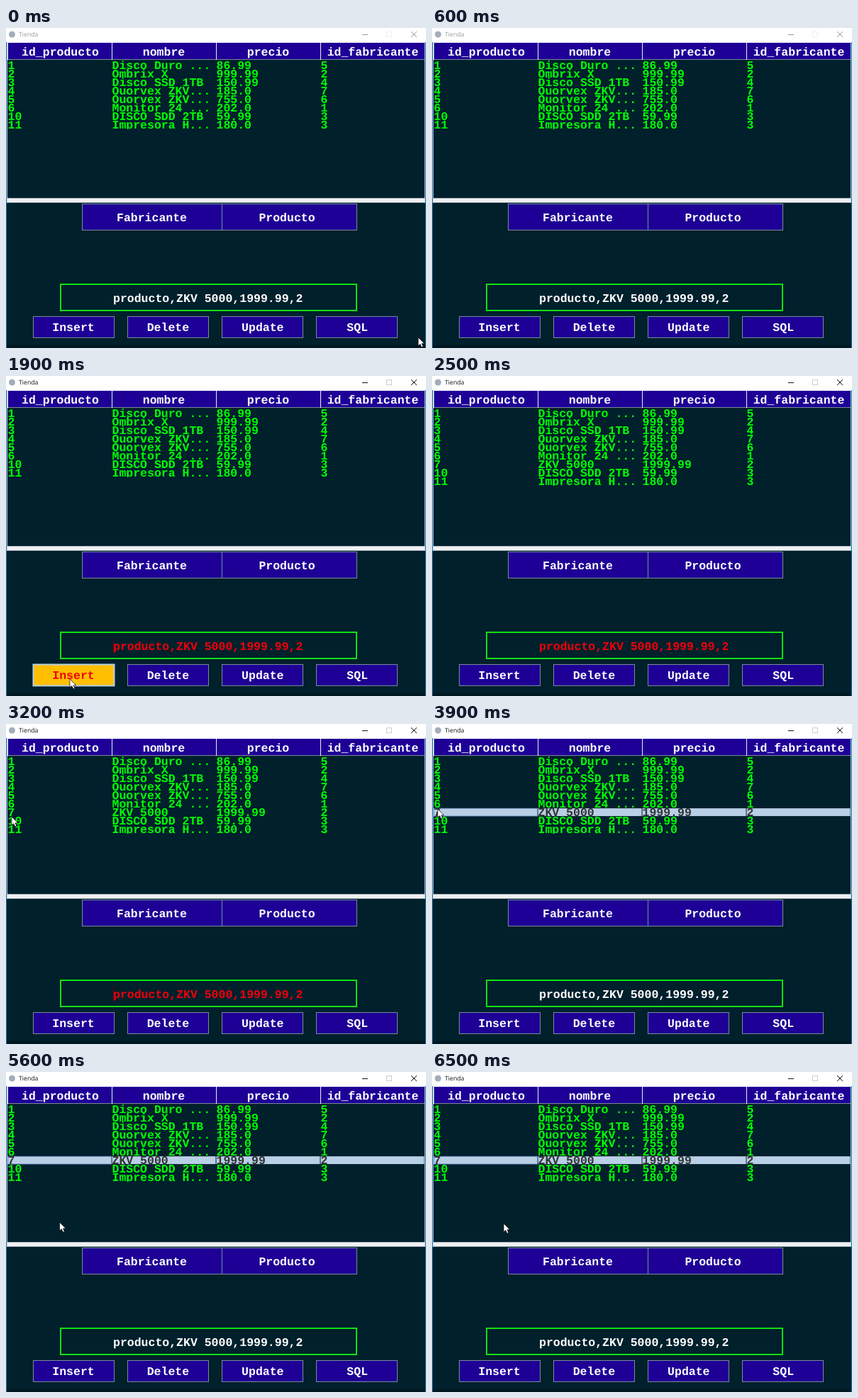
Write an HTML page that moves like this. It is 592 px wide and 452 px high and loops after 7200 ms.

```html
<!DOCTYPE html>
<html lang="es">
<head>
<meta charset="utf-8">
<title>Tienda</title>
<style>
  html, body { margin: 0; width: 100%; height: 100%; overflow: hidden; background: #00202c; }
  svg { display: block; }
  text {
    font: bold 16.5px "Courier New", "Liberation Mono", monospace;
    text-rendering: geometricPrecision; fill: #fff; white-space: pre;
  }
  .mid { text-anchor: middle; }
  .title { font: 8.7px "Open Sans", sans-serif; fill: #111; }
  .inactive .title { fill: #999; }
  .control { fill: none; stroke: #111; }
  .inactive .control { stroke: #999; }
  .control.disabled { stroke: #ccc; }
  .inactive .disabled { stroke: #eee; }
  .box { fill: #1e0096; stroke: #7a8a99; }
  .hover .box { fill: #ffbf00; stroke: #b8cfe5; stroke-width: 2; }
  .hover text, .focus text { fill: #f0000a; }
  .row text { fill: #0f0; }
  .row rect { fill: none; }
  .selected text { fill: #333; }
  .selected rect { fill: #b8cfe5; }
  .selected .lead { stroke: #6382bf; }
</style>
</head>
<body>
<svg width="592" height="452" viewBox="0 0 592 452">
  <rect width="592" height="452" fill="#00202c"/>
  <rect y="448" width="592" height="4" fill="#001720"/>
  <path d="M.5 20V452M591.5 20V452" stroke="#2878ad"/>
  <path d="M1.5 20V247M590.5 20V247" stroke="#b4cfe4"/>
  <g id="titlebar">
    <rect width="592" height="20" fill="#fff"/>
    <circle cx="8.5" cy="9" r="4.5" fill="#a3adb8"/>
    <text class="title" x="18" y="12">Tienda</text>
    <path class="control" d="M502 9.5H510"/>
    <rect class="control disabled" x="536.5" y="5.5" width="7" height="7"/>
    <path class="control" d="M571 5L579 13M579 5L571 13"/>
  </g>
  <g id="table"></g>
  <rect x="2" y="241" width="588" height="5" fill="#f0f0f0"/>
  <path d="M2 240.5H590M2 246.5H590" stroke="#a3b1be"/>
  <g id="buttons"></g>
  <g id="field">
    <rect x="77" y="362" width="417" height="37" fill="none" stroke="#10e010" stroke-width="2"/>
    <text x="151" y="387">producto,ZKV 5000,1999.99,2</text>
    <path id="caret" d="M151.5 371V391" stroke="#700008"/>
  </g>
  <path id="cursor" d="M0 0V12L2.8 9.6L4.8 14L7 13L5 8.8H8.8Z" fill="#fff" stroke="#000" stroke-width=".7"/>
</svg>
<script>
const $ = id => document.getElementById(id);

function add(parent, tag, attrs, text = '') {
  const el = document.createElementNS('http://www.w3.org/2000/svg', tag);
  for (const key in attrs) el.setAttribute(key, attrs[key]);
  el.textContent = text;
  return parent.appendChild(el);
}

const LOOP = 7200, STEP = 100;
const FOCUS = 800, INSERT = 2200, SELECT = 3600;
const ROW_TOP = 46, ROW_HEIGHT = 12.1, NEW_ROW = 6;
const columns = [2, 149, 296, 443, 590];

// Table
const headers = [['id_producto', 76.5], ['nombre', 222.5], ['precio', 369.5], ['id_fabricante', 517]];
const products = [
  '1|Disco Duro ...|86.99|5',
  '2|Ombrix X|999.99|2',
  '3|Disco SSD 1TB|150.99|4',
  '4|Quorvex ZKV...|185.0|7',
  '5|Quorvex ZKV...|755.0|6',
  '6|Monitor 24 ...|202.0|1',
  '7|ZKV 5000|1999.99|2',
  '10|DISCO SDD 2TB|59.99|3',
  '11|Impresora H...|180.0|3'
];

const table = $('table');
add(table, 'rect', { x: 2, y: 20, width: 588, height: 25, fill: '#1e0096' });
add(table, 'path', { d: 'M2 20.5H590', stroke: '#dfe3ee' });
add(table, 'path', { d: 'M2 44.5H590', stroke: '#7a8a99' });
headers.forEach(([label, x], i) => {
  add(table, 'path', { d: `M${columns[i] + .5} 20V45`, stroke: '#e8ecf2' });
  add(table, 'text', { class: 'mid', x, y: 39.3 }, label);
});

// Each row is a nested svg, so its text is clipped to the row height.
const rows = products.map(line => {
  const row = add(table, 'svg', { class: 'row', width: 592, height: ROW_HEIGHT });
  line.split('|').forEach((value, i) => {
    const x = columns[i];
    add(row, 'rect', { class: i ? '' : 'lead', x: x + .5, y: .5, width: columns[i + 1] - x - 1, height: 11 });
    add(row, 'text', { x: x + .5, y: 11.6 }, value);
  });
  return row;
});

// Buttons
const buttons = [
  ['Fabricante', 107, 248, 197, 37, 205.5],
  ['Producto', 304, 248, 190, 37, 396],
  ...['Insert', 'Delete', 'Update', 'SQL'].map((label, i) => [label, 38 + 133 * i, 407, 114, 30, 95 + 133.4 * i])
].map(([label, x, y, width, height, center]) => {
  const el = add($('buttons'), 'g', {});
  add(el, 'rect', { class: 'box', x: x + .5, y: y + .5, width, height });
  add(el, 'text', { class: 'mid', x: center, y: y + height / 2 + 6 }, label);
  return { el, area: [x, y, width, height] };
});

// Pointer path: time, x, y
const path = [
  [0, 581, 437], [600, 460, 383], [900, 430, 383], [1300, 213, 416], [1500, 213, 416],
  [1800, 90, 428], [2200, 90, 428], [2500, 82, 385], [3200, 8, 131], [3400, 8, 120],
  [4000, 8, 120], [4600, 33, 209], [5100, 33, 209], [5900, 101, 214], [LOOP, 101, 214]
];

function pointer(t) {
  const i = path.findIndex(p => p[0] > t);
  const [t0, x0, y0] = path[i - 1], [t1, x1, y1] = path[i];
  const k = (t - t0) / (t1 - t0);
  return [x0 + (x1 - x0) * k, y0 + (y1 - y0) * k];
}

const inside = ([px, py], [x, y, w, h]) => px >= x && px < x + w && py >= y && py < y + h;
const show = (el, on) => el.setAttribute('visibility', on ? 'visible' : 'hidden');

function draw(t) {
  const pos = pointer(t);
  const inserted = t >= INSERT, focused = t >= FOCUS && t < SELECT;

  $('titlebar').classList.toggle('inactive', t < FOCUS);

  rows.forEach((row, i) => {
    const slot = i > NEW_ROW && !inserted ? i - 1 : i;
    row.setAttribute('y', ROW_TOP + slot * ROW_HEIGHT);
  });
  show(rows[NEW_ROW], inserted);
  rows[NEW_ROW].classList.toggle('selected', t >= SELECT);

  buttons.forEach(b => b.el.classList.toggle('hover', inside(pos, b.area)));
  $('field').classList.toggle('focus', focused);
  show($('caret'), focused && (t - FOCUS) % 1000 < 500);

  // The arrow gives way to a text pointer over the field.
  show($('cursor'), !inside(pos, [77, 362, 417, 37]));
  $('cursor').setAttribute('transform', `translate(${pos})`);
}

const start = performance.now();
function frame() {
  const t = (performance.now() - start) % LOOP;
  draw(Math.floor(t / STEP) * STEP);
  requestAnimationFrame(frame);
}
frame();
</script>
</body>
</html>
```
